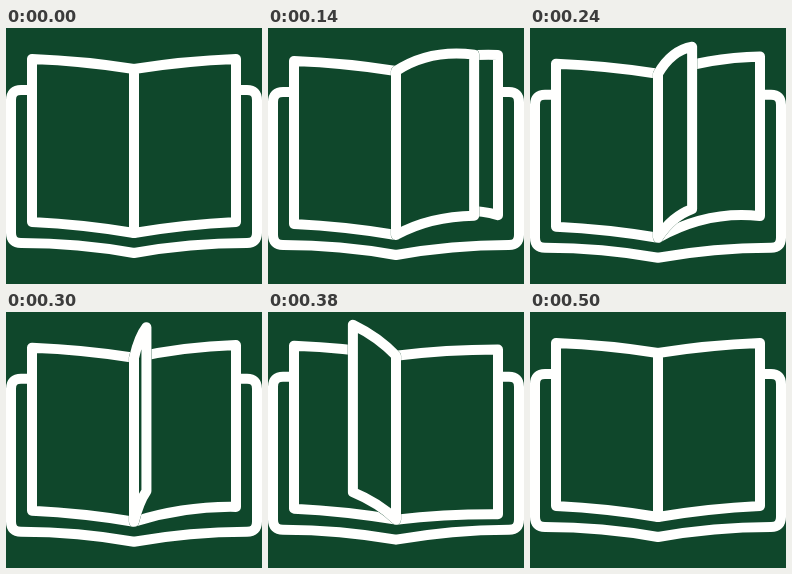
An HTML page with a canvas for the animation above (0.56 s loop, 256 by 256 pixels).

```html
<!DOCTYPE html>
<html>
<head>
<meta charset="utf-8">
<style>
html, body { margin: 0; width: 100%; height: 100%; overflow: hidden; background: #0f472b; }
canvas { display: block; }
</style>
</head>
<body>
<canvas id="stage" width="256" height="256"></canvas>
<script>
const ctx = document.getElementById('stage').getContext('2d');
const GREEN = '#0f472b', WHITE = '#fffffe';
const LOOP = 560, STEP = 20, START = 40, END = 500;
const SPINE = { x: 128, top: 41, bottom: 205 };
const EDGE = { reach: 102, top: 31, bottom: 194 };

// The turn slows down while the page stands upright: [time, degrees].
const TURN = [[START, 0], [190, 60], [300, 83], [420, 131], [END, 180]];

const cover = new Path2D(
  'M22 62H15Q5 62 5 72V205Q5 215 15 215Q72 215 128 225' +
  'Q184 215 241 215Q251 215 251 205V72Q251 62 241 62H234');

function turnAngle(t) {
  const i = TURN.findIndex(([time]) => time >= t);
  const [t0, a0] = TURN[i - 1], [t1, a1] = TURN[i];
  return (a0 + (a1 - a0) * (t - t0) / (t1 - t0)) * Math.PI / 180;
}

function stroke(path, color, width) {
  ctx.strokeStyle = color;
  ctx.lineWidth = width;
  ctx.stroke(path);
}

// Lift raises the outer edge; bulge bows the top and bottom lines upwards.
function drawPage({ angle = 0, lift = [0, 0], bulge = [3, 3], seam = false }) {
  const cos = Math.cos(angle);
  const x = SPINE.x + EDGE.reach * cos;
  const bendX = SPINE.x + 50 * cos - 5 * Math.sin(2 * angle);
  const top = EDGE.top - lift[0], bottom = EDGE.bottom - lift[1];
  const bendTop = (SPINE.top + top) / 2 - bulge[0];
  const bendBottom = (SPINE.bottom + bottom) / 2 - bulge[1];
  const path = new Path2D(
    `M${SPINE.x} ${SPINE.top}Q${bendX} ${bendTop} ${x} ${top}V${bottom}` +
    `Q${bendX} ${bendBottom} ${SPINE.x} ${SPINE.bottom}Z`);
  ctx.fillStyle = GREEN;
  ctx.fill(path);
  if (seam) stroke(path, GREEN, 10.3);
  stroke(path, WHITE, 10);
}

function draw(time) {
  const turning = time > START && time < END;
  const angle = turning ? turnAngle(time) : 0;
  const rise = Math.sin(angle) ** 2;
  const sway = Math.sin(2 * angle);
  const curl = Math.max(0, sway);
  const flutter = rise * sway * (10 + 5 * sway);
  const drop = turning ? 5 * Math.sin(Math.PI * (time - START) / (END - START)) ** 2 : 0;

  ctx.fillStyle = GREEN;
  ctx.fillRect(0, 0, 256, 256);
  ctx.save();
  ctx.translate(0, drop);
  ctx.lineJoin = 'round';
  stroke(cover, WHITE, 10);
  drawPage({ angle: Math.PI });
  drawPage({ lift: [flutter, 1.45 * flutter], bulge: [3 + 7 * curl, 3 + 22 * curl] });
  if (turning) {
    drawPage({
      angle,
      lift: [rise * (22 - 8.5 * Math.cos(angle)), 20 * rise],
      bulge: [3 + 11 * curl, 3 + 6 * curl],
      seam: true
    });
  }
  ctx.restore();
}

const start = performance.now();
function frame() {
  const t = (performance.now() - start) % LOOP;
  draw(Math.floor(t / STEP) * STEP);
  requestAnimationFrame(frame);
}
frame();
</script>
</body>
</html>
```
